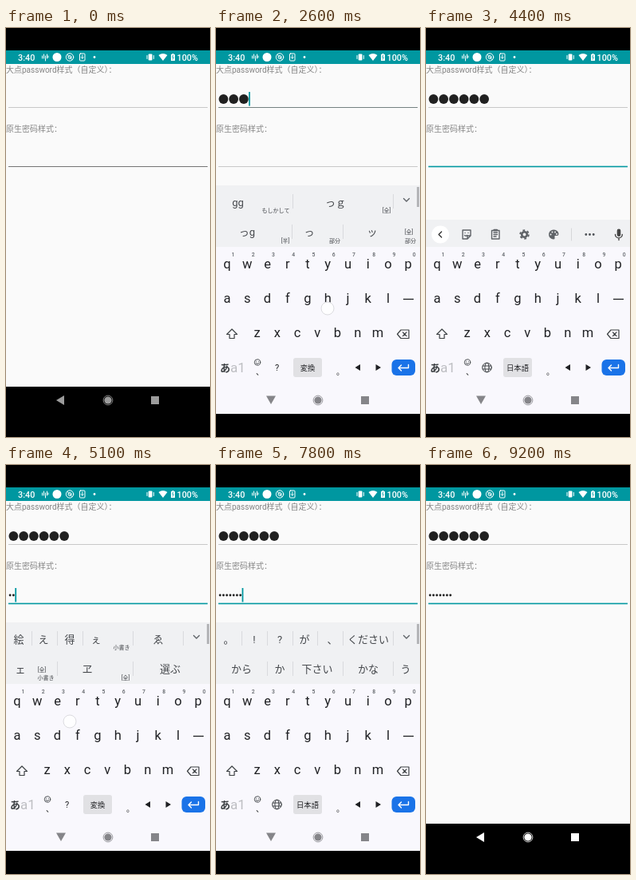
Recreate the animation shown at these times as an HTML page. Size 256 px wide and 512 px high, loop 9.3 s.

```html
<!DOCTYPE html>
<html lang="zh-CN">
<head>
<meta charset="utf-8">
<style>
html, body { margin: 0; width: 100%; height: 100%; overflow: hidden; background: #000; }
svg { display: block; width: 100%; height: 100%; }
text { font-family: Roboto, "Noto Sans CJK SC", "Noto Sans CJK", sans-serif; }
[lang=ja] text { font-family: Roboto, "Noto Sans CJK JP", "Noto Sans CJK", sans-serif; }
.mid text, text.mid { text-anchor: middle; }
.line { fill: none; stroke-linecap: round; stroke-linejoin: round; }
</style>
</head>
<body>
<svg viewBox="0 0 256 512">
  <rect width="256" height="512"/>
  <rect y="45" width="256" height="404" fill="#fafafa"/>
  <g font-size="10" fill="#848484">
    <text y="55.5">大点password样式（自定义）：</text>
    <text y="130">原生密码样式：</text>
  </g>
  <rect id="line1" x="3" y="99" width="250" height="1"/>
  <rect id="line2" x="3" width="250"/>
  <g id="dots1" fill="#202020"></g>
  <g id="dots2" fill="#202020"></g>
  <rect id="cursor"/>

  <g id="keyboard" lang="ja">
    <rect y="274" width="256" height="240" fill="#f9f8fd"/>
    <g id="toolbar">
      <rect y="240" width="256" height="34" fill="#f0f1f3"/>
      <circle cx="18" cy="258.5" r="11" fill="#fff"/>
      <g class="line" stroke="#5f6368" stroke-width="1.4">
        <path d="M19.5 255l-3.5 3.5 3.5 3.5" stroke="#333"/>
        <path d="M46 253h10v7l-4 4h-6zM52 264v-4h4M49 256.5v.1M53 256.5v.1M48.5 259.5q1.500 1.500 3 0"/>
        <path d="M82.500 253.500h9.500v10.500h-9.500zM85 256h4.500M85 258.500h4.500M85 261h3"/>
        <path d="M85.500 253h3.500" stroke-width="2.400"/>
        <circle cx="123.500" cy="258.500" r="3.300" stroke-width="2.600"/>
        <circle cx="123.500" cy="258.500" r="5.300" stroke-width="1.900" stroke-dasharray="2.800 2.750" stroke-linecap="butt"/>
        <path d="M182.500 251v15" stroke="#d5d6d9" stroke-width="1"/>
        <path d="M237.500 258.500a4.400 4.400 0 0 0 8.800 0M242 263v2.500" stroke="#444"/>
      </g>
      <path d="M160 252.500a6 6 0 0 0 0 12q2 0 1.500-2.500t1.500-2h1.500q2 0 2-2.500-1-5-6.500-5z" fill="#5f6368"/>
      <g fill="#f0f1f3"><circle cx="156.500" cy="258.500" r="1"/><circle cx="158.500" cy="255.500" r="1"/><circle cx="162" cy="255.500" r="1"/><circle cx="164" cy="258" r="1"/></g>
      <g fill="#4d5156"><circle cx="200.800" cy="258.500" r="1.400"/><circle cx="205.500" cy="258.500" r="1.400"/><circle cx="210.200" cy="258.500" r="1.400"/></g>
      <rect x="239.700" y="251.500" width="4.600" height="9.500" rx="2.300" fill="#444"/>
    </g>
    <g id="panel" class="mid">
      <rect y="197" width="256" height="77" fill="#f0f1f3"/>
      <path class="line" d="M235.500 213.500l3.500 3.500 3.500-3.500" stroke="#5f6368" stroke-width="1.400"/>
      <rect x="252" y="199" width="3" height="25" fill="#b4b5b8"/>
      <g id="words" fill="#44474b"></g>
    </g>
    <g id="keys" class="mid" fill="#202124"></g>
    <path d="M235 339.500h13" stroke="#202124" stroke-width="1.300"/>
    <g class="line" stroke="#3c4043" stroke-width="1.200">
      <path d="M20 377l6.500 6.500h-3.500v5h-6v-5h-3.500z"/>
      <path d="M232 378h10v10.500h-10l-4.500-5.250zM234.500 381l4.500 4.500M239 381l-4.500 4.500"/>
      <circle cx="52" cy="418.500" r="3.700" stroke-width=".9"/>
      <path d="M50.500 417.300v.1M53.500 417.300v.1M50 419.500q2 2 4 0" stroke-width=".9"/>
      <g id="globe" stroke-width="1">
        <circle cx="76.500" cy="425" r="5.800"/><ellipse cx="76.500" cy="425" rx="2.600" ry="5.800"/>
        <path d="M71.300 423h10.400M71.300 427h10.400"/>
      </g>
    </g>
    <text x="5" y="429.500" font-size="13" font-weight="700" fill="#3c4043">あ</text>
    <text x="18" y="431" font-size="17" fill="#bdbec2">a1</text>
    <g class="mid" fill="#202124">
      <text x="55" y="434" font-size="10">、</text>
      <text x="156" y="434" font-size="10">。</text>
      <text id="ask" x="76.500" y="429" font-size="11">?</text>
      <rect x="97" y="413" width="36" height="24" rx="3" fill="#e1e1e4"/>
      <text id="space" x="115" y="428.500" font-size="9.300"></text>
    </g>
    <path d="M174.500 425l6.500-4v8zM207 425l-6.500-4v8z" fill="#202124"/>
    <rect x="220.500" y="415" width="29.500" height="20" rx="6" fill="#1a73e8"/>
    <path class="line" d="M241.500 421.500v4h-12M232.500 422l-3.500 3.500 3.500 3.500" stroke="#fff" stroke-width="1.400"/>
  </g>

  <g id="nav">
    <path id="back"/>
    <circle cx="128" cy="466" r="4.600"/>
    <circle id="ring" cx="128" cy="466" r="5.900" fill="none" stroke-width=".8"/>
    <rect x="182" y="461" width="10" height="10"/>
  </g>
  <rect y="483" width="256" height="29"/>
  <circle id="touch" r="8" fill="#fff" fill-opacity=".85" stroke="#dcdce0"/>

  <rect y="28" width="256" height="17" fill="#0097a0"/>
  <g fill="#fff" font-weight="500" font-size="10.800">
    <text x="15" y="40.500">3:40</text>
    <text x="214.500" y="40.500">100%</text>
    <circle cx="64" cy="36.500" r="5.500"/>
    <circle cx="111" cy="36.500" r="1.400"/>
    <rect x="178.700" y="32.500" width="4.800" height="8" rx="1"/>
    <path d="M191.500 34q5.500-4 11 0l-5.500 7z"/>
    <path d="M207 33h1.500v-1h2v1h1.500v8h-5z"/>
  </g>
  <g class="line" stroke="#fff">
    <path d="M45.500 35v3M47.500 33v5M49.500 35v6M51.500 33v5M53 35v2"/>
    <circle cx="80" cy="36.500" r="4.700"/>
    <circle cx="80" cy="36.500" r="2"/>
    <path d="M76.700 33.200l6.600 6.600"/>
    <rect x="92.500" y="32" width="6.500" height="9" rx="1"/>
    <path d="M95.750 34v4M94.300 36.700l1.450 1.500 1.450-1.500M177 34.500v4M185.300 34.500v4"/>
    <path d="M209.700 34l-1 2.700h1.600l-1 2.500" stroke="#0097a0" stroke-width=".8"/>
  </g>
</svg>

<script>
const LOOP = 9300, STEP = 100, TEAL = '#0097a0', PALE = '#c8c8c8';
const $ = id => document.getElementById(id);
const set = (id, attrs) => {
  for (const k in attrs) $(id).setAttribute(k, attrs[k]);
};
const show = (id, on) => set(id, { visibility: on ? 'visible' : 'hidden' });
const label = (s, x, y, size, extra = '') =>
  `<text x="${x}" y="${y}" font-size="${size}" ${extra}>${s}</text>`;

// Keys
const row = (letters, x, y) =>
  [...letters].map((c, i) => label(c, x + i * 25.25, y, 16.5)).join('');
$('keys').innerHTML = row('qwertyuiop', 14, 301) + row('asdfghjkl', 14, 344) + row('zxcvbnm', 51.5, 387) +
  [...'1234567890'].map((c, i) => label(c, 21.5 + i * 25.25, 286, 6.8, 'font-weight="500" fill="#5f6368"')).join('');

// Password dots
const fields = [
  { id: 'dots1', pitch: 12.75, r: 5.9, y: 89, count: 6, top: 80 },
  { id: 'dots2', pitch: 4.25, r: 1.45, y: 163, count: 7, top: 154 }
];
for (const f of fields) {
  $(f.id).innerHTML = Array.from({ length: f.count }, (_, i) =>
    `<circle cx="${3 + f.pitch * (i + .5)}" cy="${f.y}" r="${f.r}"/>`).join('');
}

// Candidates: "text:x" per row, "text:x:y" for small notes, "|:x" for dividers
const mixed = (raw, wide, half, tail) => [
  `${raw}:27.5 もしかして:75:231 |:96 ${wide}:150 [全]:214:231 |:222`,
  `${half}:39 [半]:87:268.5 |:95 ${tail}`
];
const small = 'っ:117 部分:149:268.5 |:159 ッ:196 [全]:242:258 部分:244:268.5';
const erg = (raw, end, tail) =>
  mixed(raw, '絵ｒ' + end, '絵r' + tail, `えｒ${end}:166 [全]:245:268.5`);
const sets = {
  g1: mixed('g', 'ｇ', 'g', small),
  g2: mixed('gg', 'っｇ', 'っg', small),
  g3: mixed('ggh', 'っｇｈ', 'っgh', small),
  g4: mixed('gghj', 'っｇｈｊ', 'っghj', small),
  g5: mixed('gghjk', 'っｇｈｊｋ', 'っghjk', small),
  g6: mixed('gghjkk', 'っｇｈｊっ', 'っghjっ', small),
  e: [
    '絵:16 |:32 え:47 |:64 得:80 |:96 ぇ:113 小書き:145:231 |:159 ゑ:191 |:222',
    'ェ:18 [全]:45:258.5 小書き:50:268.5 |:64 ヱ:102 [全]:150:268.5 |:159 選ぶ:206'
  ],
  e3: erg('erg', 'ｇ', 'g'),
  e4: erg('ergh', 'ｇｈ', 'gh'),
  e5: erg('erghj', 'ｇｈｊ', 'ghj'),
  e6: erg('erghjj', 'ｇｈっｊ', 'ghっj'),
  e7: erg('erghjjj', 'ｇｈっっ', 'ghっっ'),
  next: [
    '。:16 |:32 !:48 |:64 ?:80 |:96 が:111 |:127 、:146 |:159 ください:191 |:222',
    'から:32 |:64 か:80 |:96 下さい:127 |:159 かな:191 |:222 う:238'
  ]
};
const words = rows => rows.map((line, i) => line.split(' ').map(item => {
  const [s, x, y] = item.split(':');
  if (s === '|') return `<rect x="${x}" y="${208 + i * 38}" width="1" height="18" fill="#d9dadd"/>`;
  return y ? label(s, x, y, 7) : label(s, x, 222.5 + i * 37.5, 13);
}).join('')).join('');

// Step tables: [time, value]
const typed1 = [[0, 0], [2200, 1], [2400, 2], [2600, 3], [2800, 4], [3000, 5], [3200, 6]];
const typed2 = [[0, 0], [4800, 1], [5000, 2], [5200, 3], [5400, 4], [5600, 5], [5800, 6], [6000, 7]];
const panel = [[0, ''], ...typed1.slice(1).map(([t, n]) => [t + 100, 'g' + n]), [3900, ''],
  [4900, 'e'], [5300, 'e3'], [5500, 'e4'], [5700, 'e5'], [5900, 'e6'], [6100, 'e7'], [6800, 'next']];
const blink = [[0, 0], [1400, 1], [1700, 0], [2200, 1], [3700, 0], [3900, 1], [4400, 0], [4800, 1],
  [6500, 0], [6800, 1], [7300, 0], [7800, 1], [8200, 0], [8700, 1], [9200, 0]];
const slide = [[0, 300], [1300, 90], [1400, 0], [7900, 35], [8000, 110], [8100, 210], [8200, 300]];
const taps = [[1200, 110, 88], [2200, 115, 350], [2400, 115, 350], [2600, 140, 351], [2800, 165, 351],
  [3000, 190, 350], [3200, 190, 350], [3900, 105, 162], [4800, 62, 318], [5000, 80, 321], [5200, 113, 350],
  [5400, 139, 351], [5600, 165, 351], [5800, 165, 351], [6000, 165, 351], [6600, 235, 427], [7900, 68, 466]];
const at = (table, t) => table.filter(e => e[0] <= t).pop()[1];

let shown = null;
function draw(t) {
  const second = t >= 3900, focused = t >= 1300;
  const counts = [at(typed1, t), at(typed2, t)];
  fields.forEach((f, k) =>
    [...$(f.id).children].forEach((dot, i) => { dot.style.display = i < counts[k] ? '' : 'none'; }));

  set('line1', { fill: focused && !second ? '#748080' : PALE });
  set('line2', {
    y: second ? 172.7 : 173,
    height: second ? 1.6 : 1,
    fill: second ? TEAL : focused ? PALE : '#757575'
  });
  const f = fields[+second], early = t < 1500;
  set('cursor', {
    x: 2.8 + f.pitch * counts[+second],
    y: f.top,
    width: early ? 1 : 1.8,
    height: 17.5,
    fill: early ? '#666' : TEAL
  });
  show('cursor', at(blink, t));

  const dy = at(slide, t), up = dy < 300, key = at(panel, t);
  $('keyboard').style.display = up ? '' : 'none';
  set('keyboard', { transform: `translate(0 ${dy})` });
  if (key !== shown) {
    shown = key;
    $('words').innerHTML = key ? words(sets[key]) : '';
    show('panel', key);
    show('toolbar', !key);
    const composing = key && key !== 'next';
    show('globe', !composing);
    show('ask', composing);
    $('space').textContent = composing ? '変換' : '日本語';
  }

  const tone = up ? '#858589' : t < 1300 ? '#9c9c9c' : '#fff';
  set('nav', { fill: tone });
  set('ring', { stroke: tone });
  set('back', { d: up ? 'M63 460.500h12l-6 10.500z' : 'M63 466l10-6v12z' });

  const tap = taps.find(([s]) => t >= s && t < s + 200);
  show('touch', tap);
  if (tap) set('touch', { cx: tap[1], cy: tap[2] });
}

const start = performance.now();
function frame() {
  const t = (performance.now() - start) % LOOP;
  draw(Math.floor(t / STEP) * STEP);
  requestAnimationFrame(frame);
}
frame();
</script>
</body>
</html>
```
